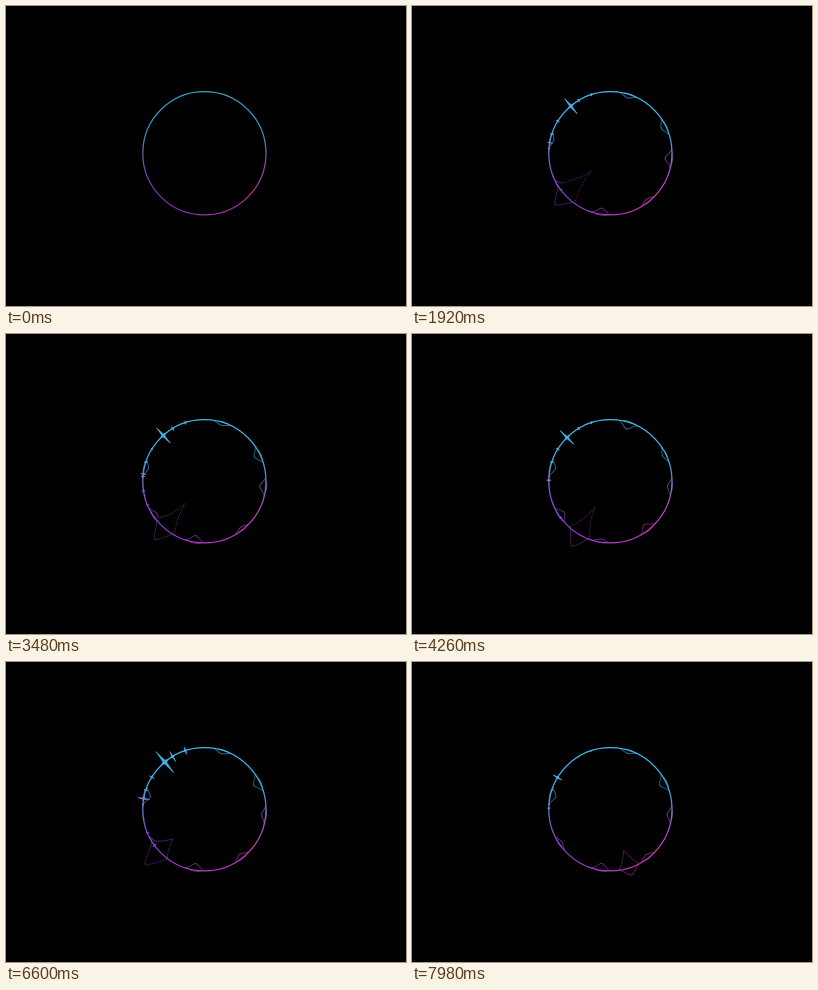
Write an HTML page with a canvas that moves like this. It is 400 by 300 pixels and loops after 8 s.

```html
<!DOCTYPE html>
<html lang="en">
<head>
<meta charset="utf-8">
<title>Sound ring</title>
<style>
html, body { margin: 0; width: 100%; height: 100%; overflow: hidden; background: #000; }
canvas { display: block; }
</style>
</head>
<body>
<canvas id="stage" width="400" height="300"></canvas>
<script>
const ctx = document.getElementById('stage').getContext('2d');
const LOOP = 8000, CX = 198.4, CY = 147.3, R = 61.6;

const hue = ctx.createConicGradient(0, CX, CY);
Object.entries({
  0: '#7a80cc', 0.06: '#b04ac0', 0.125: '#c43cb8', 0.25: '#b03cbe', 0.375: '#9040d4',
  0.46: '#8654d4', 0.5: '#6f86d6', 0.56: '#42a8e2', 0.75: '#45bcec', 0.94: '#3caade', 1: '#7a80cc'
}).forEach(([stop, color]) => hue.addColorStop(+stop, color));

// Key points of the music: [time, pitch, level]
const music = [
  [0, 0, 0], [1250, 0, 0], [1500, 0.6, 0.7], [2050, 1, 0.6], [2670, 0, 0.5], [3450, 0.9, 0.75],
  [4260, 0.75, 0.7], [5340, 1, 0.65], [6600, 1, 1], [7300, 0.6, 0.7], [LOOP, 0, 0.35]
];

const mix = (a, b, p) => a + (b - a) * p;
const smooth = p => p * p * (3 - 2 * p);
const clamp = p => Math.max(0, Math.min(1, p));

function listen(t) {
  const i = music.findIndex(([time]) => time > t);
  const [t0, pitch0, level0] = music[i - 1], [t1, pitch1, level1] = music[i];
  const p = (t - t0) / (t1 - t0);
  const flutter = 1 + 0.25 * Math.sin(Math.PI * p) * Math.sin(t / 70);
  return {
    pitch: mix(pitch0, pitch1, smooth(clamp(p * 3 - 1))),
    level: mix(level0, level1, p) * flutter
  };
}

function place(angle, radius) {
  const a = angle * Math.PI / 180;
  return [CX + radius * Math.cos(a), CY + radius * Math.sin(a)];
}

// Offset of a string that is plucked at one angle.
function bump(angle, center, size) {
  const gap = Math.abs((angle - center + 540) % 360 - 180) / (9 + size / 12);
  if (gap >= 1) return 0;
  return size * mix(Math.cos(gap * Math.PI / 2) ** 2, (1 - gap) ** 1.15, clamp(size / 25));
}

// Dots at equal angles spread apart where a string is steep.
function drawStrings({ pitch, level }, t) {
  const awake = clamp(level * 3);
  const plucks = [[72 + 65 * pitch, awake * (18 + 60 * pitch * clamp(1 - level)), 20 * level]];
  for (let k = 0; k < 8; k++) {
    if (k === 5) continue;
    const size = awake * (5 + 2 * Math.sin(t / 230 + k * 2.4));
    plucks.push([5 + 47 * k, size, size * 0.15]);
  }
  ctx.globalAlpha = 0.6;
  for (let angle = 0; angle < 360; angle += 0.8) {
    let inward = 0, outward = 0;
    for (const [center, a, b] of plucks) {
      inward += bump(angle, center, a);
      outward += bump(angle, center, b);
    }
    for (const offset of [-inward, outward]) {
      if (Math.abs(offset) < 0.3) continue;
      const [x, y] = place(angle, R + offset);
      ctx.fillRect(x - 0.5, y - 0.5, 1, 1);
    }
  }
}

// Four-pointed star across the ring.
function drawPeak(angle, reach) {
  if (reach < 0.4) return;
  const side = 1 + reach * 0.3, waist = 0.5 + reach * 0.08;
  ctx.save();
  ctx.translate(...place(angle, R));
  ctx.rotate(angle * Math.PI / 180);
  ctx.beginPath();
  for (let k = 0; k < 8; k++) {
    const radius = k % 2 ? waist * 1.4 : k % 4 ? side : reach;
    ctx.lineTo(radius * Math.cos(k * Math.PI / 4), radius * Math.sin(k * Math.PI / 4));
  }
  ctx.fill();
  ctx.fillRect(-reach, -0.4, reach * 2, 0.8);
  ctx.restore();
}

function peaksOf({ pitch, level }, t) {
  const loud = clamp(level * 3 - 2);
  const peaks = [
    [211 + 19 * pitch, 14 * level],
    [181 + 9 * smooth(clamp(pitch * 4 - 3)), (2 + 4 * loud) * clamp(level * 2)],
    [239, 2 * level + 4 * loud],
    [252, 2 * level + 2 * loud]
  ];
  for (let angle = 144; angle < 225; angle += 13.5) {
    peaks.push([angle, level * (1.8 + Math.sin(t / 190 + angle))]);
  }
  return peaks;
}

// Filling through the page-space gradient keeps rotated stars in the ring's colours.
function colorAt(angle) {
  const height = Math.sin(angle * Math.PI / 180);
  return height < -0.25 ? '#45b4ea' : height < 0.15 ? '#7088d8' : '#9a48d4';
}

function draw(now) {
  const t = now % LOOP, sound = listen(t);
  ctx.globalAlpha = 1;
  ctx.fillStyle = '#000';
  ctx.fillRect(0, 0, 400, 300);
  ctx.fillStyle = ctx.strokeStyle = hue;
  ctx.globalAlpha = mix(0.85, 1, clamp(sound.level * 3));
  ctx.lineWidth = 1.2;
  ctx.beginPath();
  ctx.arc(CX, CY, R, 0, 2 * Math.PI);
  ctx.stroke();
  drawStrings(sound, t);
  ctx.globalAlpha = 0.9;
  for (const [angle, reach] of peaksOf(sound, t)) {
    ctx.fillStyle = colorAt(angle);
    drawPeak(angle, reach);
  }
}

const start = performance.now();
function tick() {
  draw(performance.now() - start);
  requestAnimationFrame(tick);
}
tick();
</script>
</body>
</html>
```
